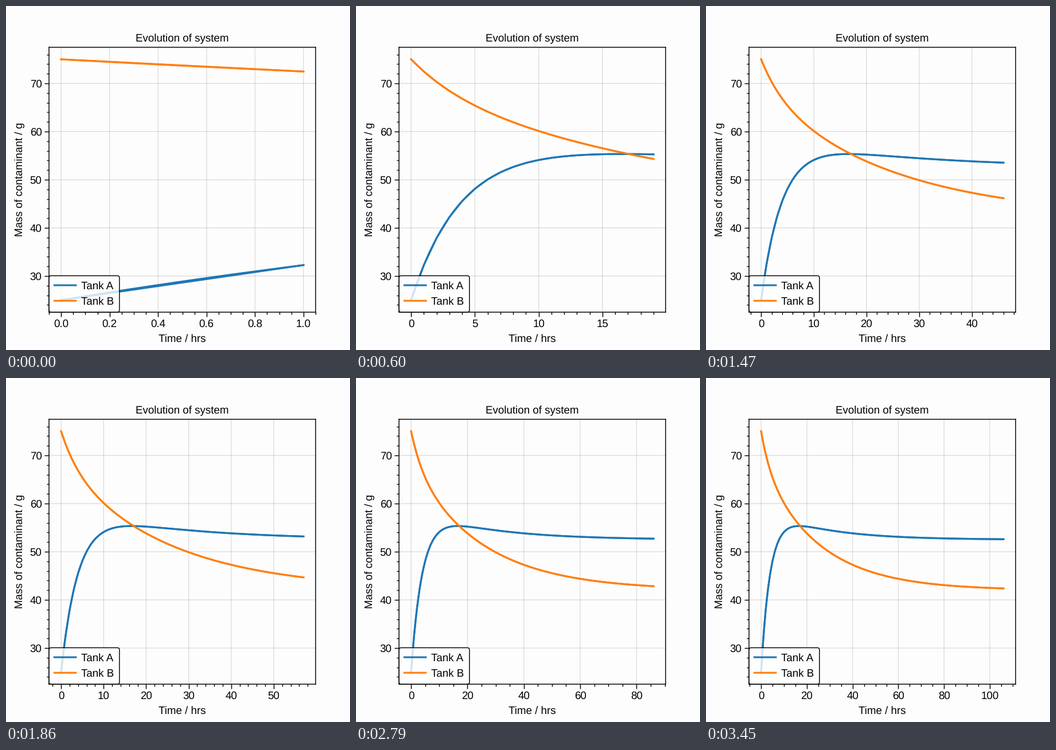
These frames come from a looping animation (600x600 px, 3.51 s). A matplotlib script:

```python
import numpy as np
import matplotlib.pyplot as plt
from matplotlib.animation import FuncAnimation
from matplotlib.ticker import AutoMinorLocator, MaxNLocator

SLOTS = 117
INTERVAL = 30
THIN = 0.7

plt.rcParams.update({
    "font.family": "Liberation Sans",
    "font.size": 9,
    "axes.titlesize": 9,
    "axes.labelsize": 9,
    "legend.fontsize": 9,
    "axes.linewidth": THIN,
    "patch.linewidth": THIN,
    "figure.facecolor": "#fdfdfd",
    "axes.facecolor": "#fdfdfd",
    # Soft, unsnapped edges and natural letter shapes.
    "path.snap": False,
    "text.hinting": "no_hinting",
})


def masses(t):
    """Solution of A' = 10.5 - 0.24 A + 0.05 B,  B' = 0.04 A - 0.05 B."""
    slow = 27.5 / 4.2 * np.exp(-0.04 * t)
    fast = -(27.5 + 27.5 / 4.2) * np.exp(-0.25 * t)
    return 52.5 + slow + fast, 42 + 4 * slow - 0.2 * fast


def hours(slot):
    # One slot in eleven repeats the previous picture.
    return 1 + slot - (slot + 5) // 11


fig, ax = plt.subplots(figsize=(4, 4), dpi=150)
fig.subplots_adjust(left=0.125, right=0.9, bottom=0.11, top=0.88)

ax.set_title("Evolution of system", pad=5)
ax.set_xlabel("Time / hrs", labelpad=4)
ax.set_ylabel("Mass of contaminant / g", labelpad=4)
ax.set_ylim(22.5, 77.5)

for axis in (ax.xaxis, ax.yaxis):
    axis.set_major_locator(MaxNLocator(8, steps=[1, 2, 2.5, 5, 10]))
    axis.set_minor_locator(AutoMinorLocator())
ax.tick_params(which="major", length=4, width=THIN, pad=2)
ax.tick_params(which="minor", length=2, width=THIN)
ax.set_axisbelow(True)
ax.grid(True, which="major", color="black", alpha=0.12, linewidth=THIN)

# Each tank has a smooth curve and an hourly polyline on top of each other.
colors = ("#1f77b4", "#ff7f0e")
smooth = [ax.plot([], [], color=c, lw=1.5, label=name)[0]
          for c, name in zip(colors, ("Tank A", "Tank B"))]
hourly = [ax.plot([], [], color=c, lw=1.5)[0] for c in colors]

legend = ax.legend(handles=smooth, loc="lower left", borderaxespad=0,
                   borderpad=0.5, labelspacing=0.5, handlelength=2,
                   handletextpad=0.5, edgecolor="black")
frame = legend.get_frame()
frame.set_alpha(None)
frame.set_facecolor((1, 1, 1, 0.8))


def update(slot):
    end = hours(slot)
    for lines, t in ((smooth, np.linspace(0, end, 400)),
                     (hourly, np.arange(end + 1))):
        for line, mass in zip(lines, masses(t)):
            line.set_data(t, mass)
    ax.set_xlim(-0.05 * end, 1.05 * end)
    return smooth + hourly


anim = FuncAnimation(fig, update, frames=SLOTS, interval=INTERVAL,
                     repeat=True, repeat_delay=0, blit=False)
plt.show()
```
